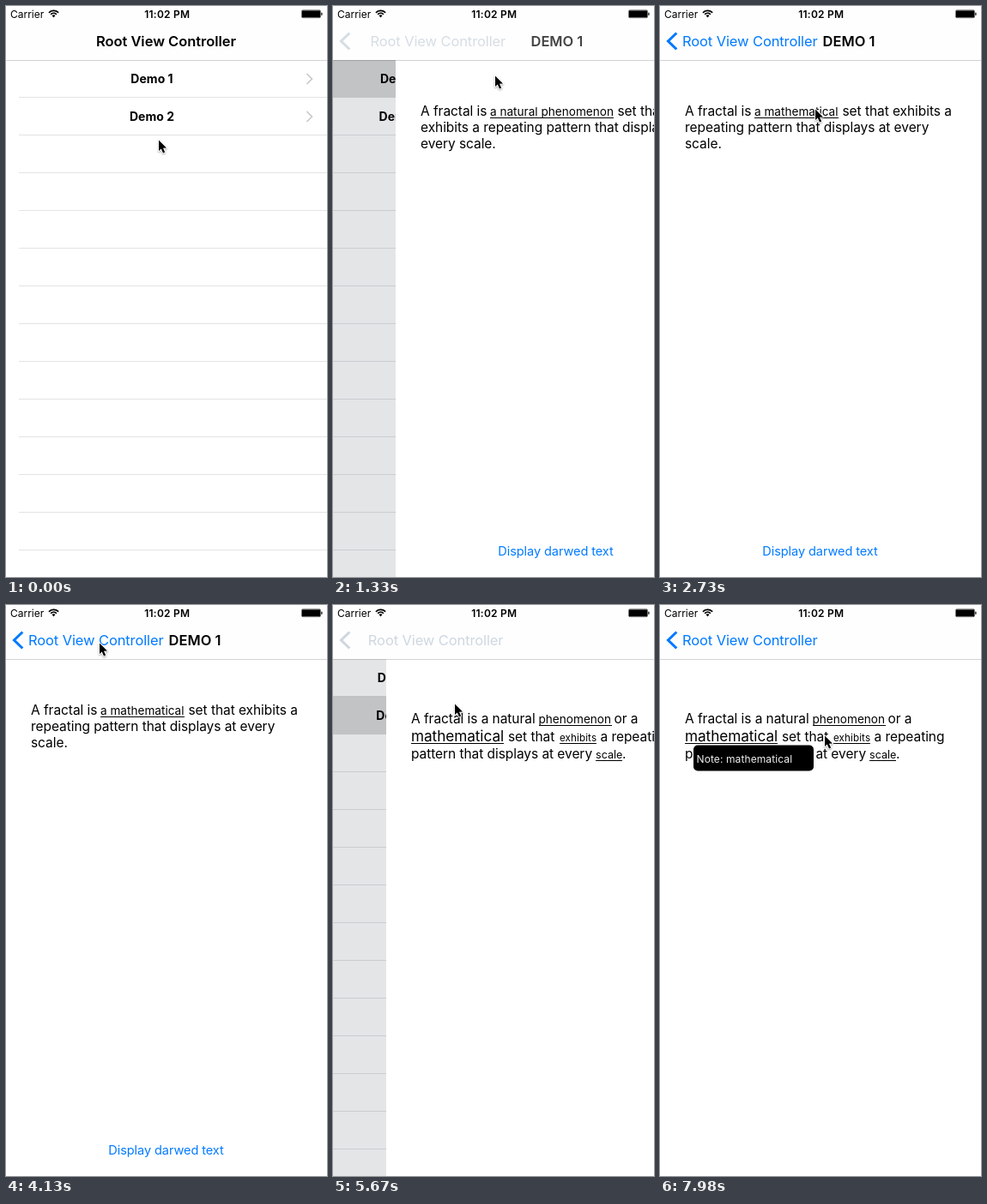
Animation of 374 by 666 pixels, one loop 8 s. Source, as an HTML page with a canvas:

```html
<!DOCTYPE html>
<html lang="en">
<head>
<meta charset="utf-8">
<title>Root View Controller</title>
<style>
html, body { margin: 0; width: 100%; height: 100%; overflow: hidden; background: #fff; }
canvas { display: block; width: 374px; height: 666px; }
</style>
</head>
<body>
<canvas id="stage"></canvas>
<script>
const W = 374, H = 666, LOOP = 8000, STEP = 70;
const BLUE = '#007aff', NAV = 63, ROW = 44;
const canvas = document.getElementById('stage');
const ctx = canvas.getContext('2d');
const dpr = window.devicePixelRatio || 1;
canvas.width = W * dpr;
canvas.height = H * dpr;

// weight, size, tracking
const FONT = {
  title: [600, 16.5, -0.03],
  back: [400, 16.5, -0.11],
  row: [700, 14, 0.03],
  body: [400, 15.5, -0.06],
  link: [400, 13.6, 0],
  big: [400, 17.2, -0.06],
  mid: [400, 12.6, 0],
  tiny: [400, 11.6, 0.12],
  button: [400, 14.55, -0.08],
  note: [400, 12, 0.1],
  status: [400, 12, 0],
  clock: [600, 12, 0.25]
};

// Cursor stops: time, x, y
const PATH = [
  [280, 178, 156], [770, 188, 81], [1190, 188, 81], [1330, 189, 81],
  [1750, 191, 89], [1960, 191, 99], [2520, 181, 120], [3360, 181, 120],
  [3710, 172, 164], [4130, 109, 44], [4200, 109, 44], [4550, 109, 44],
  [5250, 142, 115], [5740, 142, 115], [6230, 174, 127], [6300, 184, 125],
  [6580, 193, 126], [6720, 193, 126], [7490, 66, 147], [7630, 66, 147],
  [7980, 192, 152]
];

const clamp = v => Math.max(0, Math.min(1, v));
const mix = (a, b, k) => a + (b - a) * k;

// Cubic bezier (.32, .72, 0, 1)
function glide(x) {
  if (x <= 0) return 0;
  if (x >= 1) return 1;
  let lo = 0, hi = 1;
  const at = (s, a, b) => 3 * s * (1 - s) ** 2 * a + 3 * s * s * (1 - s) * b + s ** 3;
  for (let i = 0; i < 20; i++) {
    const m = (lo + hi) / 2;
    if (at(m, 0.32, 0) < x) lo = m; else hi = m;
  }
  return at(lo, 0.72, 1);
}

function text(str, x, y, style, { color = '#000', align = 'left', alpha = 1, line = false } = {}) {
  if (alpha <= 0) return;
  const [weight, size, track] = FONT[style];
  ctx.save();
  ctx.globalAlpha = alpha;
  ctx.font = `${weight} ${size}px Inter, Roboto, sans-serif`;
  ctx.letterSpacing = track + 'px';
  ctx.textAlign = align;
  ctx.fillStyle = color;
  ctx.fillText(str, x, y);
  if (line) ctx.fillRect(Math.round(x), y + 2, Math.round(ctx.measureText(str).width), 1);
  ctx.restore();
}

function rect(x, y, w, h, color) {
  ctx.fillStyle = color;
  ctx.fillRect(x, y, w, h);
}

function stroke(points, width, color, alpha = 1) {
  ctx.save();
  ctx.globalAlpha = alpha;
  ctx.strokeStyle = color;
  ctx.lineWidth = width;
  ctx.beginPath();
  points.forEach(([x, y]) => ctx.lineTo(x, y));
  ctx.stroke();
  ctx.restore();
}

function statusBar() {
  text('Carrier', 5, 14, 'status');
  text('11:02 PM', 187.8, 14, 'clock', { align: 'center' });
  ctx.strokeStyle = '#000';
  ctx.lineWidth = 1.7;
  for (const r of [4.6, 7.6]) {
    ctx.beginPath();
    ctx.arc(55.5, 13, r, -Math.PI * 0.76, -Math.PI * 0.24);
    ctx.stroke();
  }
  ctx.fillStyle = '#000';
  ctx.beginPath();
  ctx.moveTo(55.5, 13.5);
  ctx.arc(55.5, 13, 2.6, -Math.PI * 0.76, -Math.PI * 0.24);
  ctx.fill();
  ctx.lineWidth = 0.6;
  ctx.beginPath();
  ctx.roundRect(344.4, 4.9, 22.2, 8.8, 1.6);
  ctx.stroke();
  rect(345, 5.4, 21, 7.8, '#000');
  rect(367.3, 7.8, 1.2, 3, '#000');
}

function list(p, selected, selAlpha) {
  ctx.save();
  ctx.translate(-0.3 * W * p, 0);
  for (let y = 106; y < H; y += ROW) rect(15, y, W, 1, '#e3e3e5');
  if (selAlpha > 0) {
    ctx.globalAlpha = selAlpha;
    rect(0, NAV - 1 + ROW * selected, W * 1.3, ROW + 1, '#d9d9d9');
    ctx.globalAlpha = 1;
  }
  for (let i = 0; i < 2; i++) {
    const y = 85 + ROW * i;
    text('Demo ' + (i + 1), 170, y + 5, 'row', { align: 'center' });
    stroke([[350.5, y - 6], [356.5, y], [350.5, y + 6]], 1.6, '#c7c7cc');
  }
  ctx.restore();
  if (p > 0) rect(0, NAV, W, H, `rgba(0,10,30,${0.105 * clamp(p * 1.25)})`);
}

function pageOne(changed) {
  const under = { line: true };
  text('A fractal is', 29, 128, 'body');
  if (changed) {
    text('a mathematical', 110, 128, 'link', under);
    text('set that exhibits a', 212.5, 128, 'body');
    text('repeating pattern that displays at every', 29, 147, 'body');
    text('scale.', 29, 166, 'body');
  } else {
    text('a natural phenomenon', 110, 128, 'link', under);
    text('set that', 258.5, 128, 'body');
    text('exhibits a repeating pattern that displays at', 29, 147, 'body');
    text('every scale.', 29, 166, 'body');
  }
  text('Display darwed text', 186.5, 641, 'button', { color: BLUE, align: 'center' });
}

function pageTwo() {
  const under = { line: true };
  text('A fractal is a natural', 29, 138, 'body');
  text('phenomenon', 177.5, 138, 'link', under);
  text('or a', 265.5, 138, 'body');
  text('mathematical', 29, 159, 'big', under);
  text('set that', 142, 159, 'body');
  text('exhibits', 202, 159, 'tiny', under);
  text('a repeating', 249.5, 159, 'body');
  text('pattern that displays at every', 29, 179, 'body');
  text('scale', 244, 179, 'mid', under);
  text('.', 275, 179, 'body');
}

function note(word, x, y) {
  ctx.fillStyle = '#000';
  ctx.beginPath();
  ctx.roundRect(x, y, 140, 30, 5);
  ctx.fill();
  text('Note: ' + word, x + 3.5, y + 20, 'note', { color: '#f0f0f0' });
}

function cursor(t) {
  let i = 0;
  while (i < PATH.length - 2 && t >= PATH[i + 1][0]) i++;
  const [t0, x0, y0] = PATH[i], [t1, x1, y1] = PATH[i + 1];
  const u = clamp((t - t0) / (t1 - t0)), k = u * u * (3 - 2 * u);
  ctx.save();
  ctx.translate(mix(x0, x1, k), mix(y0, y1, k));
  ctx.beginPath();
  [[0, 0.5], [0, 13], [2.8, 10.4], [5, 15.4], [7.2, 14.4], [5, 9.7], [9, 9.5]]
    .forEach(([x, y]) => ctx.lineTo(x, y));
  ctx.closePath();
  ctx.lineJoin = 'round';
  ctx.lineWidth = 2;
  ctx.strokeStyle = '#fff';
  ctx.shadowColor = 'rgba(0,0,0,.35)';
  ctx.shadowBlur = 2 * dpr;
  ctx.shadowOffsetY = dpr;
  ctx.stroke();
  ctx.shadowColor = 'transparent';
  ctx.fillStyle = '#000';
  ctx.fill();
  ctx.restore();
}

// Which page is open, how far it has slid in, and how the bar has faded
function stateAt(t) {
  const DUR = 526;
  const second = t >= 5460;
  const popping = t >= 4440 && !second;
  const age = t - (second ? 5518 : popping ? 4440 : 1190);
  const slide = glide(age / DUR);
  const leave = clamp(1 - age / 130), enter = clamp((age - 80) / 300);
  const shown = clamp(age / 190);
  const s = {
    page: second ? 1 : 0,
    p: popping ? 1 - slide : slide,
    root: popping ? enter : leave,
    back: popping ? leave * 0.2 : enter,
    tint: popping ? 1 : enter,
    title: popping ? 1 - shown : shown,
    sel: popping ? 1 - clamp(age / DUR) : t >= 1190 ? 1 : 0
  };
  if (t >= 4270 && t < 4440) s.back = t < 4340 ? 0.5 : 0.2;
  return s;
}

function navBar(s) {
  rect(0, 0, W, NAV, '#fefefe');
  rect(0, NAV, W, 1, 'rgba(0,0,0,.17)');
  const name = 'Root View Controller';
  const x = mix(116, 26, s.p);
  if (s.p > 0) text(name, x, 47, 'title', { alpha: s.root });
  else text(name, 186.5, 47, 'title', { align: 'center' });
  // The back button warms up from slate to blue
  const color = `rgb(${mix(70, 0, s.tint)},${mix(80, 122, s.tint)},${mix(90, 255, s.tint)})`;
  text(name, x, 47, 'back', { color, alpha: s.back });
  if (s.back > 0) stroke([[19.3, 31.5], [9.5, 41], [19.3, 50.5]], 3.1, color, s.back);
  if (s.page === 0 && s.p > 0)
    text('DEMO 1', mix(430, 220, s.p), 47, 'title', { align: 'center', alpha: s.title });
}

function draw(t) {
  ctx.setTransform(dpr, 0, 0, dpr, 0, 0);
  rect(0, 0, W, H, '#fff');
  const s = stateAt(t);
  if (s.p < 1) list(s.p, s.page, s.sel);
  if (s.p > 0) {
    ctx.save();
    ctx.translate(Math.round(W * (1 - s.p)), 0);
    rect(0, NAV, W, H, '#fff');
    if (s.page) pageTwo(); else pageOne(t >= 2660);
    ctx.restore();
  }
  navBar(s);
  statusBar();
  if (t >= 7630) note('mathematical', 39, 163.5);
  else if (t >= 6720) note('phenomenon', 167, 142);
  cursor(t);
}

function tick(now) {
  const t = now % LOOP;
  draw(Math.floor(t / STEP) * STEP);
  requestAnimationFrame(tick);
}
requestAnimationFrame(tick);
</script>
</body>
</html>
```
